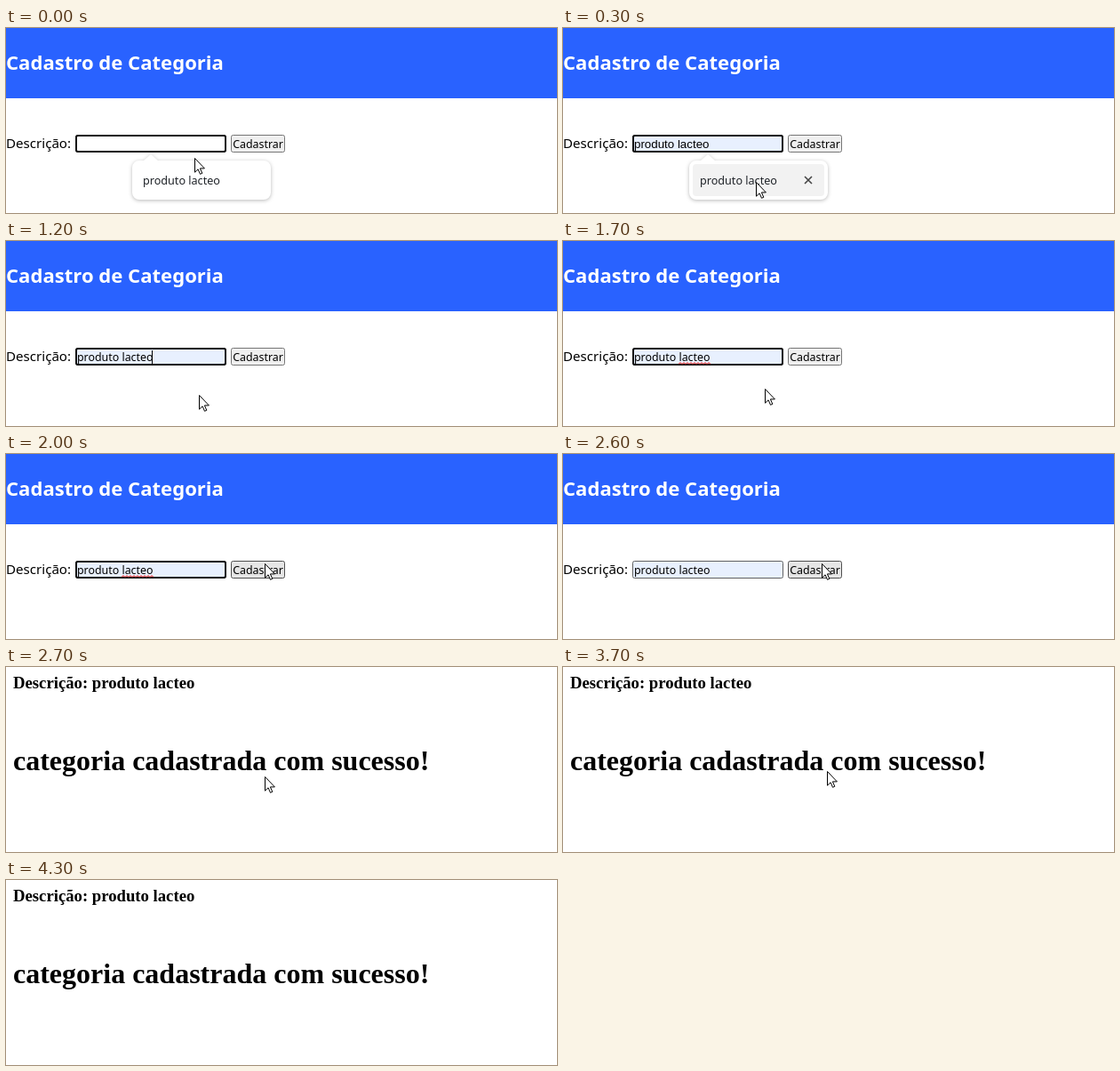
Recreate the animation shown at these times as an HTML page. Size 620 by 208 pixels, loop 5400 ms.

```html
<!DOCTYPE html>
<html lang="pt-BR">
<head>
<meta charset="utf-8">
<title>Cadastro de Categoria</title>
<style>
html, body { margin: 0; width: 100%; height: 100%; overflow: hidden; background: #fff; }
svg { display: block; width: 620px; height: 208px; }
text { font-family: "Noto Sans", sans-serif; font-size: 12.4px; fill: #000; white-space: pre; }
.title { font-size: 22.1px; font-weight: 700; fill: #fff; }
.label { font-size: 15.1px; }
.option { font-size: 12.6px; fill: #1f2328; }
.preview { font: 13.33px "Liberation Sans", Arial, sans-serif; }
.result text { font: bold 18.72px "Liberation Serif", "Times New Roman", serif; }
.result .message { font-size: 32px; }
.popup { filter: drop-shadow(0 1px 2px rgba(0, 0, 0, .28)); }

/* Every change is a hard step on one shared 5.4 s clock. */
.t { animation: 5.4s step-end infinite; }
.form { animation-name: form; }
.result { animation-name: result; }
.popup { animation-name: popup; }
.hover { animation-name: hover; }
.fill { animation-name: fill; }
.typed { animation-name: typed; }
.caret { animation-name: caret; }
.spell { animation-name: spell; }
.focus { animation-name: focus; }
.button { animation-name: button; }
.cursor { animation-name: cursor; }

@keyframes form { 0% { visibility: visible } 50%, 100% { visibility: hidden } }
@keyframes result { 0% { visibility: hidden } 50%, 100% { visibility: visible } }
@keyframes popup { 0% { visibility: visible } 22.222%, 100% { visibility: hidden } }
@keyframes hover { 0% { visibility: hidden } 1.851% { visibility: visible } 22.222%, 100% { visibility: hidden } }
@keyframes fill { 0% { fill: #fff } 1.851%, 100% { fill: #e8f0fe } }
@keyframes typed { 0% { visibility: hidden } 22.222% { visibility: visible } 50%, 100% { visibility: hidden } }
@keyframes caret { 0% { visibility: hidden } 22.222% { visibility: visible } 31.481%, 100% { visibility: hidden } }
@keyframes spell { 0% { visibility: hidden } 31.481% { visibility: visible } 40.740%, 100% { visibility: hidden } }
@keyframes focus { 0% { visibility: visible } 40.740%, 100% { visibility: hidden } }
@keyframes button {
  0% { fill: #efefef; stroke: #767676 }
  35.185% { fill: #e5e5e5; stroke: #4f4f4f }
  40.740% { fill: #f5f5f5; stroke: #8d8d8d }
  48.148%, 100% { fill: #e5e5e5; stroke: #4f4f4f }
}
@keyframes cursor {
  0% { transform: translate(212px, 146px) }
  1.851% { transform: translate(214px, 159px) }
  3.703% { transform: translate(216px, 170px) }
  5.555% { transform: translate(217px, 173px) }
  31.481% { transform: translate(227px, 166px) }
  33.333% { transform: translate(259px, 144px) }
  35.185% { transform: translate(285px, 128px) }
  37.037% { transform: translate(291px, 123px) }
  68.518% { transform: translate(297px, 117px) }
  77.777% { transform: translate(297px, 107px); visibility: visible }
  79.629%, 100% { transform: translate(297px, 107px); visibility: hidden }
}
</style>
</head>
<body>
<svg viewBox="0 0 620 208">
  <defs>
    <pattern id="wave" x="130" y="136" width="4" height="3" patternUnits="userSpaceOnUse">
      <path d="M0 2.4 2 .6 4 2.4" fill="none" stroke="#f02020"/>
    </pattern>
  </defs>

  <g class="t form">
    <rect width="620" height="79" fill="#2962ff"/>
    <text class="title" x="0" y="47">Cadastro de Categoria</text>
    <text class="label" x="0" y="135">Descrição:</text>

    <rect class="t fill" x="78.5" y="120.5" width="169" height="19" rx="2" stroke="#606060"/>
    <rect class="t focus" x="79" y="121" width="168" height="18" rx="2" fill="none" stroke="#101010" stroke-width="2"/>
    <text class="t hover preview" x="80" y="135">produto lacteo</text>
    <text class="t typed" x="80" y="135">produto lacteo</text>
    <rect class="t caret" x="164" y="123" width="1" height="15"/>
    <rect class="t spell" x="130" y="136" width="36" height="3" fill="url(#wave)"/>

    <rect class="t button" x="253.5" y="120.5" width="60" height="19" rx="2"/>
    <text x="283.5" y="135" text-anchor="middle">Cadastrar</text>
  </g>

  <g class="t popup">
    <path d="M150 149h5l8-7 8 7h119a8 8 0 0 1 8 8v28a8 8 0 0 1-8 8H150a8 8 0 0 1-8-8v-28a8 8 0 0 1 8-8z" fill="#fff"/>
    <g class="t hover">
      <rect x="146" y="153" width="148" height="36" rx="4" fill="#f2f2f2"/>
      <path d="m272 167 8 8m0-8-8 8" stroke="#444" stroke-width="1.6"/>
    </g>
    <text class="option" x="154" y="176">produto lacteo</text>
  </g>

  <g class="t result">
    <text x="8" y="24">Descrição: produto lacteo</text>
    <text class="message" x="8" y="116">categoria cadastrada com sucesso!</text>
  </g>

  <path class="t cursor" d="M.5 .5V16.2l3.6-3.4 2.4 5.5 2.3-1-2.4-5.4h5z" fill="#fff" stroke="#000"/>
</svg>
</body>
</html>
```
